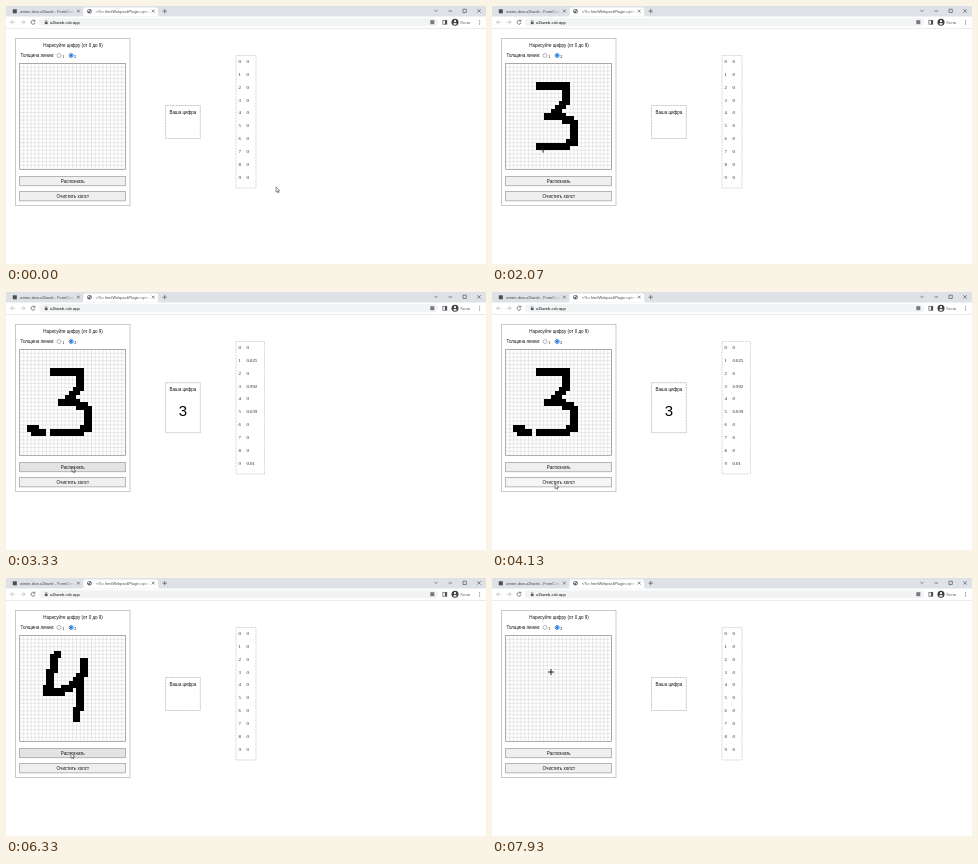
An HTML page for the animation above (8000 ms loop, 480 by 258 pixels).

```html
<!DOCTYPE html>
<html lang="ru">
<head>
<meta charset="utf-8">
<title>Распознавание цифр</title>
<style>
  html, body { margin: 0; width: 100%; height: 100%; overflow: hidden; background: #fff; }
  svg { display: block; width: 480px; height: 258px; }
  text { font-family: "Liberation Sans", Arial, sans-serif; font-size: 4.5px; fill: #111; }
  .mid { text-anchor: middle; }
  .tab { font-size: 3.9px; fill: #45494d; }
  .serif { font-family: "Liberation Serif", "Times New Roman", serif; font-size: 4.8px; fill: #222; }
  .line { fill: none; stroke: #55585c; stroke-width: .7; }
  .dots { fill: #fff; stroke: #aaa; stroke-width: .7; stroke-dasharray: 1 .5; }
  .button { stroke: #8a8a8a; stroke-width: .6; }
</style>
</head>
<body>
<svg viewBox="0 0 480 258">
  <defs>
    <linearGradient id="fadeGrey"><stop stop-color="#dee1e6" stop-opacity="0"/><stop offset="1" stop-color="#dee1e6"/></linearGradient>
    <linearGradient id="fadeWhite"><stop stop-color="#fff" stop-opacity="0"/><stop offset="1" stop-color="#fff"/></linearGradient>
    <clipPath id="clip1"><rect x="13" width="55" height="10"/></clipPath>
    <clipPath id="clip2"><rect x="89" width="55" height="10"/></clipPath>
  </defs>

  <!-- browser window -->
  <rect width="480" height="10.5" fill="#dee1e6"/>
  <path d="M75 10.5q2.5 0 2.5-2.5V3.5q0-2 2-2H150q2 0 2 2V8q0 2.5 2.5 2.5z" fill="#fff"/>
  <rect x="6.8" y="3.3" width="4" height="4" fill="#4b4e52"/>
  <text class="tab" x="14" y="6.6" clip-path="url(#clip1)">winter-dew-u2bweb - FormCrates</text>
  <rect x="60" y="2" width="8.5" height="7" fill="url(#fadeGrey)"/>
  <circle cx="83.5" cy="5.2" r="2.3" fill="#5f6368"/>
  <path d="M82 4.2l1.5-.8.2 1.4-1 1zM84.3 5l1 .4-.6 1.2-.9-.6z" fill="#fff"/>
  <text class="tab" x="90" y="6.6" clip-path="url(#clip2)">&lt;%= htmlWebpackPlugin.options.t</text>
  <rect x="136" y="2" width="8.5" height="7" fill="url(#fadeWhite)"/>
  <path class="line" d="M71 3.7l2.8 2.8m0-2.8L71 6.500M145.800 3.700l2.800 2.800m0-2.800l-2.800 2.800M156.500 5.200h4.400m-2.200-2.200v4.400"/>
  <path class="line" d="M428.400 4l1.600 1.600L431.600 4M442.500 5h3.600M457 3.200h3.300v3.300H457zM471.300 3.200l3.400 3.400m0-3.400l-3.400 3.400"/>

  <rect x="33" y="12.300" width="399" height="8" rx="4" fill="#f1f3f4"/>
  <path class="line" d="M0 22.500H480" style="stroke:#e1e3e6"/>
  <path class="line" d="M8.800 16.200H4.600m2-2l-2 2 2 2M14.800 16.200H19m-2-2l2 2-2 2" style="stroke:#b4b7ba"/>
  <path class="line" d="M28.500 14.800a2 2 0 1 0 .5 1.900M28.900 13.700v1.600h-1.600"/>
  <rect x="38.800" y="15.900" width="2.800" height="2.200" fill="#55585c"/>
  <path class="line" d="M39.400 16v-.8a.8.8 0 0 1 1.600 0v.8" style="stroke-width:.5"/>
  <text x="44" y="17.700" style="font-size:4.100px">u2bweb.csb.app</text>
  <rect x="424.300" y="14.200" width="4" height="4" fill="#777b80"/>
  <rect class="line" x="436.900" y="14.300" width="3.900" height="3.900"/>
  <rect x="439" y="14.300" width="1.900" height="3.900" fill="#45494d"/>
  <circle cx="449" cy="16.200" r="3.500" fill="#3c4043"/>
  <circle cx="449" cy="15.200" r="1.100" fill="#fff"/>
  <path d="M446.900 18q2.100-2.200 4.200 0-2.100 1.500-4.200 0" fill="#fff"/>
  <text class="tab" x="454.500" y="17.600">Гость</text>
  <path d="M473.200 13.900h.9v.9h-.9zm0 1.800h.9v.9h-.9zm0 1.800h.9v.9h-.9z" fill="#55585c"/>

  <!-- drawing panel -->
  <rect x="9.500" y="32.500" width="114.500" height="167" fill="none" stroke="#b5b5b5" stroke-width=".7"/>
  <text class="mid" x="67" y="41">Нарисуйте цифру (от 0 до 9)</text>
  <text x="14.500" y="51.200">Толщина линии:</text>
  <circle cx="53" cy="49.500" r="2" fill="#fff" stroke="#888" stroke-width=".6"/>
  <text class="serif" x="56" y="51.700">1</text>
  <circle cx="65.200" cy="49.500" r="2" fill="#fff" stroke="#0b70e8" stroke-width=".8"/>
  <circle cx="65.200" cy="49.500" r="1.200" fill="#0b70e8"/>
  <text class="serif" x="68" y="51.700">2</text>
  <path id="grid" fill="none" stroke="#d2d2d2" stroke-width=".5"/>
  <path id="ink" fill="#000" shape-rendering="crispEdges"/>
  <rect x="13.700" y="57.500" width="105.800" height="105.800" fill="none" stroke="#858585" stroke-width=".7"/>
  <rect id="readBtn" class="button" x="13.700" y="170.500" width="105.800" height="9.300"/>
  <text class="mid" x="66.800" y="176.700">Распознать</text>
  <rect id="clearBtn" class="button" x="13.700" y="185.600" width="105.800" height="9.300"/>
  <text class="mid" x="66.800" y="191.800">Очистить холст</text>

  <!-- answer and scores -->
  <rect id="answerBox" class="dots" x="159.500" width="34.800"/>
  <text id="answerLabel" class="mid" x="176.900">Ваша цифра</text>
  <text id="answer" class="mid" x="176.900" y="124.300" style="font-size:15px;fill:#000"></text>
  <rect id="scoreBox" class="dots" x="230" y="49.500" height="132.500" style="stroke:#c4c4c4"/>
  <g id="scores"></g>

  <path id="arrow" d="M0 0V5.200L1.200 4.100 2 5.900 2.900 5.500 2.100 3.800H3.700z" fill="#fff" stroke="#222" stroke-width=".5"/>
  <path id="cross" d="M-3 0H3M0-3V3" stroke="#111" stroke-width=".9"/>
</svg>
<script>
const LOOP = 8000, FPS = 15, LEFT = 13.9, TOP = 57.5, CELL = 3.77;
const $ = id => document.getElementById(id);
const set = (el, attrs) => { for (const k in attrs) el.setAttribute(k, attrs[k]); };

// Pen paths in grid cells, drawn between two steps
const strokes = [
  { from: 23, to: 31, wipe: 64, path: [[8,5],[15,5],[15,9],[12,12],[10,13],[14,13],[16,14],[17,16],[17,20],[16,20],[14,21],[8,21]] },
  { from: 31, to: 33, wipe: 64, path: [[5,21],[3,21],[3,20],[2,20]] },
  { from: 71, to: 76, wipe: 109, path: [[9,4],[8,5],[8,8],[7,9],[7,12],[6,13]] },
  { from: 76, to: 87, wipe: 109, path: [[6,14],[9,14],[11,13],[13,12],[16,9],[16,6],[16,9],[15,10],[15,17],[14,19],[14,21]] }
];

// Pointer: step, x, y
const moves = [
  [9,270,181], [22,51,79.5], [23,48,82], [33,25,140], [34,28,143], [35,28,143],
  [42,60,160], [46,64,185], [48,66,175], [53,66,175], [62,63,191.5], [64,63,191.5],
  [71,53,78], [87,73,143], [89,68,152], [95,65,175], [102,65,175], [107,66,190],
  [111,66,190], [115,67,170.5], [119,59,94]
];

const results = [
  { from: 50, to: 64, digit: 3, score: { 1: .025, 3: .992, 5: .039, 9: .01 } },
  { from: 99, to: 109, digit: 4, score: { 1: .012, 4: .985, 9: .031 } }
];
const presses = { readBtn: [48, 49, 98], clearBtn: [62, 63, 108] };

function walk(path) {
  const cells = [path[0]];
  for (let i = 1; i < path.length; i++) {
    const [x, y] = path[i - 1], dx = path[i][0] - x, dy = path[i][1] - y;
    const n = Math.max(Math.abs(dx), Math.abs(dy));
    for (let k = 1; k <= n; k++) cells.push([Math.round(x + dx * k / n), Math.round(y + dy * k / n)]);
  }
  return cells;
}
strokes.forEach(s => s.cells = walk(s.path));

let lines = "";
for (let i = 1; i < 28; i++) {
  lines += `M${LEFT + i * CELL} ${TOP}v105.6M${LEFT} ${TOP + i * CELL}h105.6`;
}
set($("grid"), { d: lines });

function addText(x, y, content) {
  const el = document.createElementNS("http://www.w3.org/2000/svg", "text");
  set(el, { x, y, class: "serif" });
  el.textContent = content;
  $("scores").append(el);
  return el;
}
const scoreCells = Array.from({ length: 10 }, (_, i) => {
  const y = 57 + i * 12.85;
  addText(232.600, y, i);
  return addText(240.400, y, 0);
});

function pointerAt(step) {
  const i = moves.findIndex(m => m[0] >= step);
  if (i === 0) return moves[0].slice(1);
  const [s0, x0, y0] = moves[i - 1], [s1, x1, y1] = moves[i];
  const p = (step - s0) / (s1 - s0), e = p * p * (3 - 2 * p);
  return [x0 + (x1 - x0) * e, y0 + (y1 - y0) * e];
}

function drawInk(step) {
  let d = "", tip = null;
  for (const s of strokes) {
    if (step <= s.from || step >= s.wipe) continue;
    const p = Math.min(1, (step - s.from) / (s.to - s.from));
    const shown = s.cells.slice(0, Math.round(s.cells.length * p));
    for (const [c, r] of shown) {
      const x = LEFT + c * CELL, y = TOP + r * CELL, size = 2 * CELL;
      d += `M${x} ${y}h${size}v${size}h${-size}z`;
    }
    if (step <= s.to && shown.length) {
      const [c, r] = shown[shown.length - 1];
      tip = [LEFT + (c + 1.85) * CELL, TOP + (r + 1.85) * CELL];
    }
  }
  set($("ink"), { d });
  return tip;
}

function drawButton(id, step, x, y) {
  const el = $(id), top = +el.getAttribute("y");
  const over = x > 14 && x < 119 && y >= top && y <= top + 9.3;
  const fill = presses[id].includes(step) ? "#f5f5f5" : over ? "#e3e3e3" : "#efefef";
  set(el, { fill, stroke: "#8a8a8a" });
}

function drawResult(step) {
  const r = results.find(v => step >= v.from && step < v.to);
  set($("answerBox"), r ? { y: 90.700, height: 50 } : { y: 99.500, height: 33 });
  set($("answerLabel"), { y: r ? 99.200 : 108 });
  set($("scoreBox"), { width: r ? 28.500 : 20 });
  $("answer").textContent = r ? r.digit : "";
  scoreCells.forEach((el, i) => el.textContent = r && r.score[i] || 0);
}

function render(time) {
  const step = Math.min(119, Math.floor((time + 4) * FPS / 1000));
  const [x, y] = drawInk(step) || pointerAt(step);
  const onCanvas = x > LEFT && x < 119.5 && y > TOP && y < 163;
  drawButton("readBtn", step, x, y);
  drawButton("clearBtn", step, x, y);
  drawResult(step);
  const transform = `translate(${x} ${y})`;
  set($("arrow"), { transform, visibility: onCanvas ? "hidden" : "visible" });
  set($("cross"), { transform, visibility: onCanvas ? "visible" : "hidden" });
}

const start = performance.now();
function tick() {
  render((performance.now() - start) % LOOP);
  requestAnimationFrame(tick);
}
tick();
</script>
</body>
</html>
```
